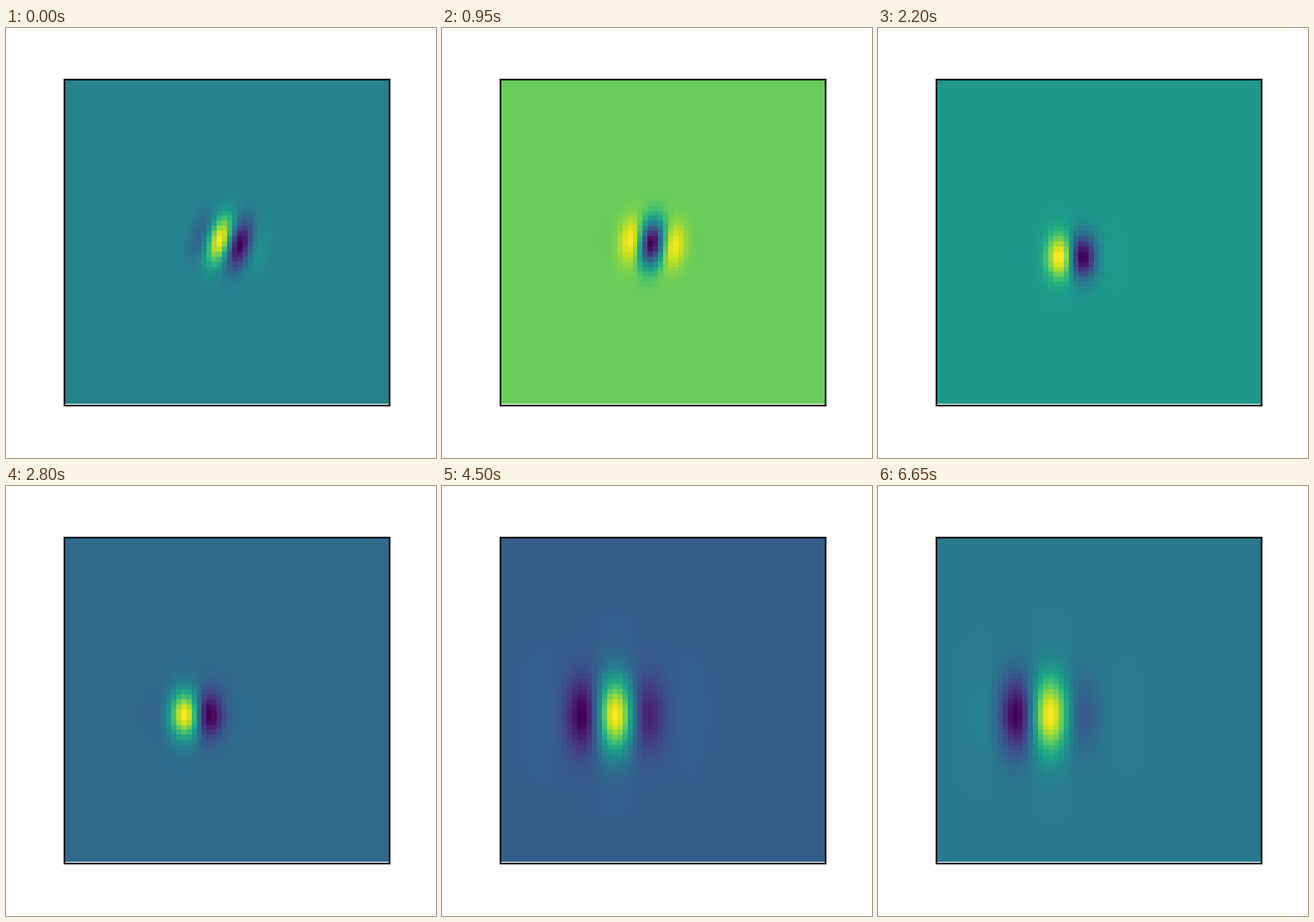
These frames come from a looping animation (500x500 px, 10000 ms). A matplotlib script:

```python
import numpy as np
import matplotlib.pyplot as plt
from matplotlib.animation import FuncAnimation

STAGE, DPI = 500, 100
STEP_MS, FRAMES = 50, 200
GRID = 64
SETTLED = 6.65  # seconds until the wavelet stops changing

cells = np.arange(GRID) + 0.5
X, Y = np.meshgrid(cells, cells)


def ramp(t, start, end):
    return min(max((t - start) / (end - start), 0), 1)


def smooth(u):
    return u * u * (3 - 2 * u)


def ease_out(u):
    return np.sin(np.pi / 2 * u)


def gabor(t):
    """Wavelet that drifts left, straightens up, then widens."""
    t = min(t, SETTLED)
    cx = 32 - 11.65 * ease_out(ramp(t, 0, SETTLED) ** 1.08)
    cy = 32.05 + 3 * smooth(ramp(t, 0.6, 2.3))
    sigma = 3.1 + 0.3 * np.exp(-2 * t) + 2.25 * smooth(ramp(t, 2.4, 5))
    k = 0.382 + 0.263 * (1 - ramp(t, 0, 3.3)) ** 1.3
    tilt = 0.27 * (1 - ramp(t, 0, 1.7))
    rise = ease_out(ramp(t, 0, 1.05))
    fall = 1 - (1 - ramp(t, 1.05, SETTLED)) ** 1.9
    phase = 1.15 + 1.98 * rise - 4.08 * fall

    dx, dy = X - cx, Y - cy
    along = dx * np.cos(tilt) + dy * np.sin(tilt)
    envelope = np.exp(-(dx ** 2 + dy ** 2) / (2 * sigma ** 2))
    return envelope * np.cos(k * along + phase)


fig = plt.figure(figsize=(STAGE / DPI, STAGE / DPI), dpi=DPI, facecolor="white")
ax = fig.add_axes([68 / STAGE, 61 / STAGE, 378 / STAGE, 379 / STAGE])
image = ax.imshow(gabor(0), cmap="viridis", interpolation="nearest",
                  aspect="auto", extent=(0, 378, 377, -1))
ax.set(xlim=(0, 378), ylim=(379, 0), xticks=[], yticks=[])
for spine in ax.spines.values():
    spine.set_linewidth(2 * 72 / DPI)


def update(n):
    data = gabor(n * STEP_MS / 1000)
    image.set_data(data)
    image.set_clim(data.min(), data.max())
    return [image]


anim = FuncAnimation(fig, update, frames=FRAMES, interval=STEP_MS,
                     init_func=lambda: update(0), repeat=True, repeat_delay=0)
plt.show()
```
